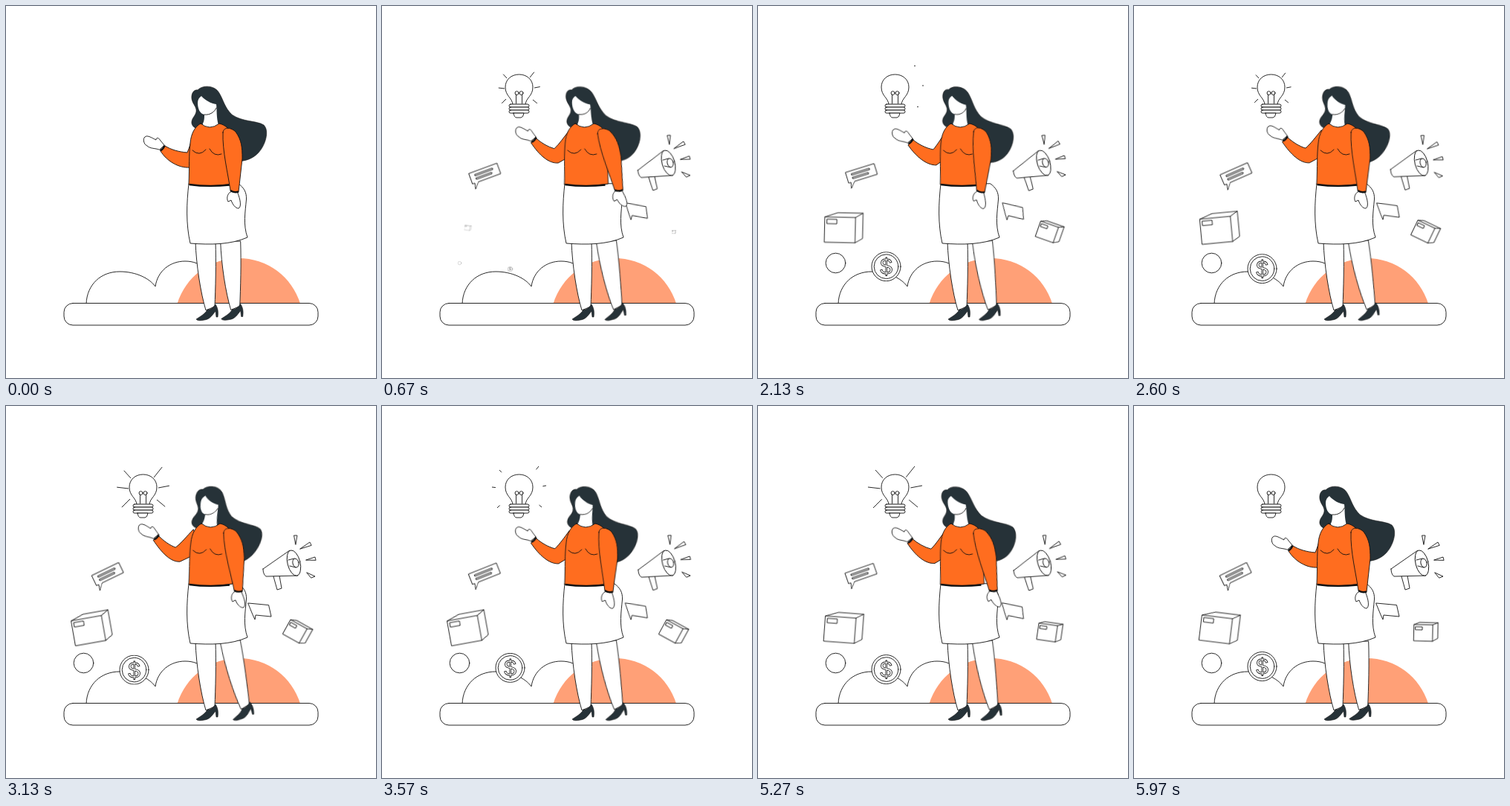
Animation of 498x500 px, one loop 6010 ms. Source, as an HTML page without scripts:

```html
<!DOCTYPE html>
<html lang="en">
<head>
<meta charset="utf-8">
<title>Woman with floating ideas</title>
<style>
  html, body { margin: 0; width: 100%; height: 100%; overflow: hidden; background: #fff; }
  svg { display: block; width: 100vw; height: 100vh; }

  .ink { fill: #fff; stroke: #111; stroke-width: .9; stroke-linejoin: round; stroke-linecap: round; }
  .line { fill: none; }
  .dark { fill: #263238; stroke: #111; stroke-width: .6; }
  .top { fill: #ff6d1f; }
  .band { fill: none; stroke: #111; stroke-width: 2.4; }

  /* Body: one loop */
  .body { animation: 6010ms ease-in-out infinite; }
  .head { transform-origin: 270px 134px; animation-name: head; }
  .torso { transform-origin: 272px 241px; animation-name: torso; }
  .sleeve {
    --down: path("M252 172C250 180 247 190 244 197C232 196 222 193 214 188L208 195C216 208 232 218 247 217L262 200Z");
    --mid: path("M252 169C247 178 241 187 236 193C226 191 216 186 209 180L202 187C213 203 227 214 240 214L262 198Z");
    --up: path("M252 166C243 175 236 184 228 190C220 187 212 181 206 175L198 180C210 198 222 210 234 209L262 196Z");
    d: var(--down);
    animation-name: sleeve;
  }
  .palm { transform-origin: 210px 190px; animation-name: palm; }
  .arm { transform-origin: 303px 172px; animation-name: arm; }
  .leg { transform-origin: 304px 318px; animation-name: leg; }

  @keyframes head {
    0%, 100% { transform: matrix(1, 0, 0, 1, 0, 0); }
    24%, 76% { transform: matrix(.94, .08, .08, .97, -5.5, 0); }
    51% { transform: matrix(.955, .07, -.16, 1, 3, 0); }
  }
  @keyframes torso {
    0%, 100% { transform: translateX(0) skewX(0deg); }
    24%, 76% { transform: translateX(-1px) skewX(2.2deg); }
    51% { transform: translateX(0) skewX(-.8deg); }
  }
  @keyframes sleeve {
    0%, 100% { d: var(--down); }
    17%, 50%, 80% { d: var(--up); }
    34%, 67% { d: var(--mid); }
  }
  @keyframes palm {
    0%, 100% { transform: translate(0, 0) rotate(0deg); }
    17%, 50%, 80% { transform: translate(-8px, -15px) rotate(4deg); }
    34%, 67% { transform: translate(-5px, -9px) rotate(2deg); }
  }
  @keyframes arm {
    0%, 100% { transform: rotate(0deg); }
    17% { transform: rotate(-11.5deg); }
    35% { transform: rotate(5.5deg); }
    51% { transform: rotate(-4deg); }
    67% { transform: rotate(6deg); }
    82% { transform: rotate(-9deg); }
  }
  @keyframes leg {
    0%, 100% { transform: rotate(0deg); }
    17% { transform: rotate(-7.5deg); }
    35%, 67% { transform: rotate(-4.3deg); }
    51% { transform: rotate(-8.8deg); }
    82% { transform: rotate(-7deg); }
  }

  /* Floating things */
  .pop { transform-box: fill-box; transform-origin: center; animation: 6010ms ease-out infinite; }
  .p1 { animation-name: pop1; }
  .p2 { animation-name: pop2; }
  .p3 { animation-name: pop3; }
  @keyframes pop1 { 0%, .5% { transform: scale(0); } 7% { transform: scale(1.08); } 9%, 100% { transform: scale(1); } }
  @keyframes pop2 { 0%, 3% { transform: scale(0); } 10.5%, 100% { transform: scale(1); } }
  @keyframes pop3 { 0%, 10.5% { transform: scale(0); } 17% { transform: scale(1.06); } 19%, 100% { transform: scale(1); } }

  .sway { animation: sway 1502.5ms cubic-bezier(.37, 0, .63, 1) infinite alternate; }
  @keyframes sway { from { transform: rotate(var(--from)); } to { transform: rotate(var(--to)); } }
  .note { --from: -26deg; --to: -12deg; }
  .chat { --from: 0deg; --to: 13deg; transform-origin: 331px 288px; }
  .horn { --from: 0deg; --to: -6.3deg; transform-origin: 384px 255px; }

  .coin { animation: bob 1001.667ms cubic-bezier(.37, 0, .63, 1) infinite alternate; }
  @keyframes bob { to { transform: translateY(4.8px); } }
  .coin text { font: 30px "Liberation Sans", Arial, sans-serif; text-anchor: middle; stroke-width: .8; }

  .big { transform-origin: 116px 298px; animation: big 6010ms ease-in-out infinite; }
  @keyframes big {
    0%, 22%, 100% { transform: rotate(7deg); }
    11% { transform: rotate(9deg); }
    56% { transform: rotate(-10.5deg); }
  }
  .small { transform-origin: 393px 303px; animation: small 6010ms linear infinite; }
  @keyframes small {
    0%, 100% { transform: rotate(1deg); }
    11% { transform: rotate(0deg); }
    22% { transform: rotate(5deg); }
    35% { transform: rotate(19deg); }
    45% { transform: rotate(27deg); }
    55% { transform: rotate(30deg); }
    65% { transform: rotate(27deg); }
    76% { transform: rotate(18deg); }
    88% { transform: rotate(8deg); }
  }

  /* Light rays grow outwards, then leave from the inside */
  .rays { stroke-linecap: butt; stroke-dasharray: 1 3; animation: rays 2003.333ms linear infinite; }
  @keyframes rays {
    0%, 23% { stroke-dashoffset: 1; }
    28.5% { stroke-dashoffset: .62; }
    54% { stroke-dashoffset: .1; }
    62% { stroke-dashoffset: 0; }
    67% { stroke-dashoffset: -.1; }
    78% { stroke-dashoffset: -.7; }
    87%, 100% { stroke-dashoffset: -1; }
  }
  .sparks { fill: #111; animation: sparks 6010ms step-end infinite; }
  @keyframes sparks {
    0%, 36%, 70%, 98.5% { opacity: 0; }
    29%, 62.5%, 95.5% { opacity: 1; }
  }
</style>
</head>
<body>
<svg viewBox="0 0 498 500" xmlns="http://www.w3.org/2000/svg">
  <defs>
    <g id="leg">
      <path class="ink" d="M255 317C256 348 262 386 269 409L281 404C282 380 283 345 282 317Z"/>
      <path class="dark" d="M256 421C262 417 269 413 271 408C275 409 279 405 282 401C285 406 286 410 285 418H283L282 410C278 415 275 421 267 422Q258 424 256 421Z"/>
    </g>
  </defs>

  <!-- Ground, clouds, sun -->
  <path class="ink" d="M108 400C109 374 128 357 153 357C175 357 193 366 201 377C204 356 221 343 241 343C263 343 280 356 285 400Z"/>
  <path d="M230.500 400A86.600 86.600 0 0 1 396 400Z" fill="#ffa077"/>
  <rect class="ink" x="78" y="399.500" width="342" height="29.500" rx="12"/>

  <!-- Bulb -->
  <g class="ink line rays">
    <path pathLength="1" d="M199 96L211 81"/>
    <path pathLength="1" d="M205 110L221 107"/>
    <path pathLength="1" d="M203 126L215 136"/>
    <path pathLength="1" d="M168 97L158 86"/>
    <path pathLength="1" d="M165 111L148 109"/>
    <path pathLength="1" d="M167 125L155 137"/>
  </g>
  <g class="sparks">
    <circle cx="211" cy="80.500" r=".8"/>
    <circle cx="222" cy="107" r=".8"/>
    <circle cx="215" cy="135.500" r=".8"/>
  </g>
  <g class="ink pop p1">
    <path d="M176 132C175 123 166 121 166 109C166 99 174 92 184.500 92C195 92 203 99 203 109C203 121 194 123 193 132Z"/>
    <path class="line" d="M180.500 131V119M188.500 131V119"/>
    <circle class="line" cx="181.500" cy="117" r="2.500"/>
    <circle class="line" cx="187.500" cy="117" r="2.500"/>
    <rect x="171" y="132" width="27" height="4" rx="2"/>
    <rect x="171" y="136" width="27" height="4" rx="2"/>
    <rect x="171" y="140" width="27" height="4" rx="2"/>
    <path d="M177 144H191Q190 150 187 150H181Q178 150 177 144Z"/>
  </g>

  <!-- Megaphone -->
  <g class="pop p2"><g class="ink sway horn">
    <path d="M360 229L365 247L371 245L368 228Z"/>
    <path d="M346 219L382 194L393 228L350 229Q346 226 346 219Z"/>
    <ellipse cx="387.500" cy="211" rx="8.500" ry="17.500" transform="rotate(-14 387.500 211)"/>
    <path class="line" d="M380 207L388 205M382 215L390 217"/>
    <ellipse cx="390" cy="211" rx="4" ry="6" transform="rotate(-14 390 211)"/>
    <path d="M388 174H392L390 186ZM396 192L409 183L411 187ZM404 207L416 203L417 207ZM405 224L416 229L411 231Z"/>
  </g></g>

  <!-- Speech bubbles -->
  <g class="pop p2"><g transform="translate(144.500 241.600)"><g class="ink sway note">
    <path d="M-20 -25H20V-10H-12L-19 -2L-17 -10H-20Z"/>
    <path d="M-13 -21H12V-19H-13ZM-13 -16H9V-14H-13Z"/>
  </g></g></g>
  <g class="pop p2"><g class="ink sway chat">
    <path d="M326 265L353.500 267.500L357 283L336 281L335 287L332 280.500Z"/>
  </g></g>

  <!-- Boxes, disc, coin -->
  <g class="pop p3"><g class="ink big">
    <path d="M90 284L107 278H141V312L131 318H90Z"/>
    <path class="line" d="M90 284H131V318M131 284L141 278"/>
    <path d="M93 287H106V293H93Z"/>
  </g></g>
  <g class="pop p3"><g class="ink small">
    <path d="M377 294L384 291H409V312L402 316H377Z"/>
    <path class="line" d="M377 294H402V316M402 294L409 291"/>
    <path d="M379 297H388V301H379Z"/>
  </g></g>
  <circle class="ink pop p3" cx="104.500" cy="345.500" r="13.300"/>
  <g class="pop p3"><g class="ink coin">
    <circle cx="172.500" cy="350" r="19.500"/>
    <circle cx="172.500" cy="350" r="16.300"/>
    <text x="172.500" y="360">$</text>
  </g></g>

  <!-- Woman -->
  <g class="body head">
    <path class="dark" d="M250 125C249 116 254 112 258 113C264 106 281 106 287 117C293 127 294 136 304 146C318 156 338 154 347 160C355 168 349 188 339 198C331 206 322 208 313 209L295 195L262 166C254 165 249 161 250 155C251 149 257 146 256 139C255 134 251 131 250 125Z"/>
    <path fill="#fff" d="M263 121C268 127 276 131 283 132C284 140 283 150 286 160L285 172H262L265 158C267 154 267 150 267 146C261 145 258 138 258 130C258 126 260 123 263 121Z"/>
    <path class="ink line" d="M267 146C275 147 281 142 283 137"/>
  </g>
  <use href="#leg"/>
  <g class="body leg"><use href="#leg" x="33.700" y="-.5"/></g>
  <path class="ink" d="M246 239C243 265 242 293 248 319C275 321 302 321 325 311C319 294 322 277 323.500 260C324 250 320 244 313 239Z"/>
  <path class="ink top body sleeve"/>
  <g class="body palm">
    <path class="ink" d="M206 193C201 191 194 192 190 188C185 186 184 178 187 176C190 173 196 177 202 180C202 176 206 177 208 181L213 187Z"/>
    <path class="band" d="M207.500 194.500Q212 192 213.500 187.500"/>
  </g>
  <g class="body torso">
    <path class="ink top" d="M262 158Q274 168 287 158C296 160 302 166 304 176L305 239Q275 244 246 240C247 215 246 200 248 184C249 172 254 162 262 158Z"/>
    <path class="ink line" d="M251 194Q260 203 269 193M274 192Q280 203 290 199"/>
    <path class="band" d="M247 240Q272 243.500 301 240.500"/>
    <g class="body arm">
      <path class="ink" d="M302 250C297 253 297 260 299 263L303 261C305 267 309 272 313 272C317 270 316 261 311 249Z"/>
      <path class="ink top" d="M292 170C293 161 304 164 309 169C317 180 318 190 318 205L313 250Q307 252 302 248C299 226 291 195 292 170Z"/>
      <path class="band" d="M302 248Q307 251.500 313 249.500"/>
    </g>
  </g>
</svg>
</body>
</html>
```
